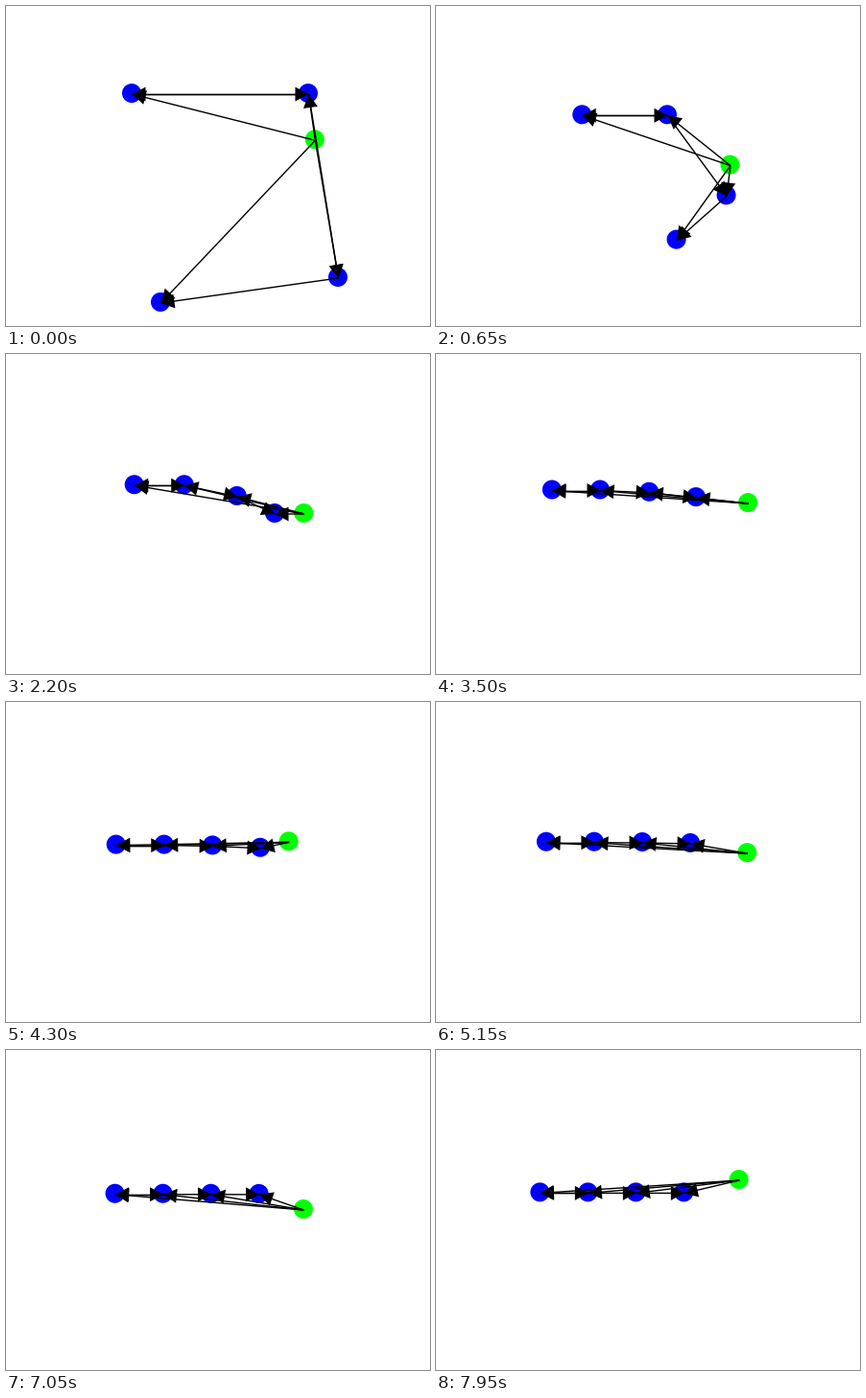
Write a matplotlib script that moves like this. It is 442x334 px and loops after 8000 ms.

```python
import numpy as np
import matplotlib.pyplot as plt
from matplotlib.animation import FuncAnimation
from matplotlib.patches import Circle, Polygon

W, H, DPI = 442, 334, 100
FRAMES, STEP_MS = 160, 50
SUBSTEPS = 10

# Leader circles a fixed point; followers settle in a row 50 px apart.
CENTER = np.array([310.0, 150.0])
ORBIT = 16
SPEED = np.radians(11.15)      # per frame
PHASE = np.radians(-42)
GAIN = 0.633                   # per second
SPACING = np.array([50.0, 0.0])

START = np.array([[131, 91], [315, 91], [346, 283], [161, 309]], float)
LEADER = 4
EDGES = [(0, 1), (1, 0), (1, 2), (2, 3)] + [(LEADER, i) for i in range(4)]

RADIUS = 10
HEAD_LEN, HEAD_HALF = 14, 7.5
LINE_SHIFT = np.array([0.5, 1.0])


def leader_at(frame):
    a = PHASE + SPEED * frame
    return CENTER + ORBIT * np.array([np.cos(a), np.sin(a)])


def simulate():
    """Consensus formation: each node is pulled to its slot beside each sender."""
    nodes = np.vstack([START, leader_at(0)])
    path = [nodes.copy()]
    dt = STEP_MS / 1000 / SUBSTEPS
    for frame in range(FRAMES - 1):
        for s in range(SUBSTEPS):
            pull = np.zeros_like(nodes)
            for src, dst in EDGES:
                pull[dst] += nodes[src] - nodes[dst] - (src - dst) * SPACING
            nodes = nodes + GAIN * dt * pull
            nodes[LEADER] = leader_at(frame + (s + 1) / SUBSTEPS)
        path.append(nodes.copy())
    return path


def head_points(tail, tip):
    d = tip - tail
    d = d / np.hypot(*d)
    side = np.array([-d[1], d[0]]) * HEAD_HALF
    base = tip - d * HEAD_LEN
    return np.array([tip, base + side, base - side])


PATH = simulate()

fig = plt.figure(figsize=(W / DPI, H / DPI), dpi=DPI, facecolor="white")
ax = fig.add_axes([0, 0, 1, 1])
ax.set_xlim(0, W)
ax.set_ylim(H, 0)
ax.axis("off")

dots = [Circle((0, 0), RADIUS, fc="#00ff00" if i == LEADER else "#0000ff",
               ec="none", zorder=1) for i in range(5)]
heads = [Polygon(np.zeros((3, 2)), fc="black", ec="none", zorder=3) for _ in EDGES]
for patch in dots + heads:
    ax.add_patch(patch)
lines = [ax.plot([], [], color="black", lw=1.4 * 72 / DPI, zorder=2,
                 solid_capstyle="butt")[0] for _ in EDGES]


def draw(frame):
    nodes = PATH[frame]
    for dot, p in zip(dots, nodes):
        dot.center = tuple(p)
    for (src, dst), line, head in zip(EDGES, lines, heads):
        tail, tip = nodes[src] + LINE_SHIFT, nodes[dst] + LINE_SHIFT
        line.set_data([tail[0], tip[0]], [tail[1], tip[1]])
        head.set_xy(head_points(tail, tip))
    return dots + lines + heads


anim = FuncAnimation(fig, draw, frames=FRAMES, interval=STEP_MS,
                     init_func=lambda: draw(0), repeat=True, repeat_delay=0)
plt.show()
```
